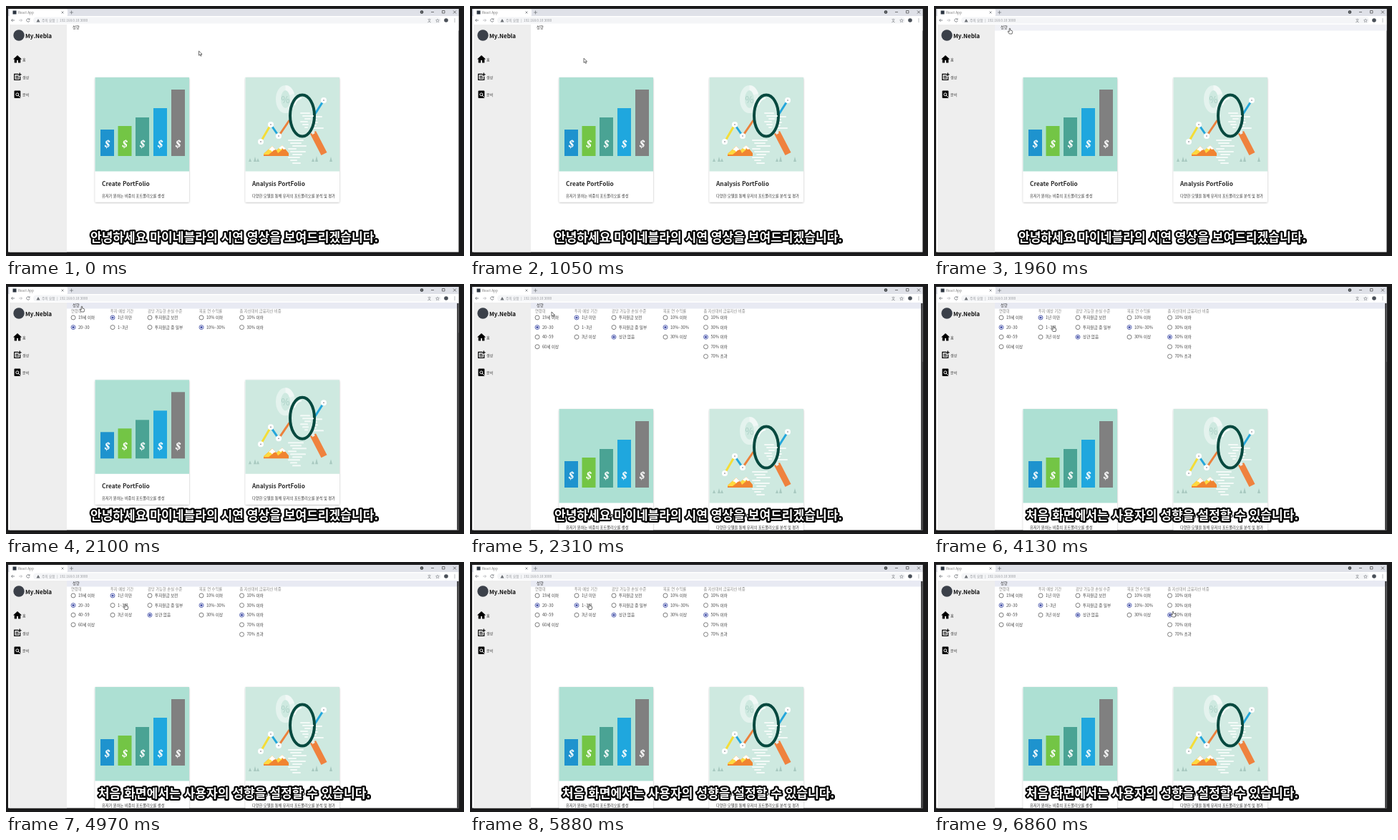
Animation, 640 px wide and 350 px high, one loop 6930 ms. Source, as an HTML page:

```html
<!DOCTYPE html>
<html lang="ko">
<head>
<meta charset="utf-8">
<title>Portfolio demo</title>
<style>
  html, body { margin: 0; width: 100%; height: 100%; overflow: hidden; background: #1b1b1c; }
  svg { display: block; width: 100vw; height: 100vh; }
  text { font-family: "Noto Sans CJK KR", "Noto Sans CJK", "Noto Sans", sans-serif; white-space: pre; }
  .caption { font-size: 17.1px; font-weight: 700; fill: #fff; stroke: #000; stroke-width: 4.5px;
             stroke-linejoin: round; paint-order: stroke; text-anchor: middle; }
</style>
</head>
<body>
<svg viewBox="0 0 640 350">
  <defs>
    <clipPath id="window"><rect x="3" y="4" width="629.5" height="340.5"/></clipPath>
    <clipPath id="page"><rect x="85" y="26" width="548" height="319"/></clipPath>
    <clipPath id="panel"><rect id="panelClip" x="85" y="34" width="548" height="0"/></clipPath>
    <filter id="shadow" x="-10%" y="-10%" width="120%" height="120%">
      <feDropShadow dx="0" dy="0.8" stdDeviation="1" flood-opacity=".3"/>
    </filter>
  </defs>
  <rect width="640" height="350" fill="#1b1b1c"/>
  <g clip-path="url(#window)">
    <rect x="3" y="3" width="630" height="342" fill="#fff"/>
    <g id="browser"></g>
    <g clip-path="url(#page)">
      <g id="content"></g>
      <g id="form" clip-path="url(#panel)"></g>
      <g id="header"></g>
    </g>
    <g id="sidebar"></g>
    <rect id="pageEdge" x="630.3" y="27" width="3" height="318" fill="#2a2a2c"/>
  </g>
  <g id="cursor">
    <path id="arrow" d="M0 0v6.2l1.5-1.3 1.1 2.3 1-.5-1-2.2h2z" fill="#fff" stroke="#333" stroke-width=".7"/>
    <path id="hand" d="M-.8 .6Q0-.5 .7 .6V3l2.4.6Q4 4 3.6 5.5L3 8H-.7L-2.8 5q0-1 1-.6l1 .8z"
          fill="#fff" stroke="#333" stroke-width=".7"/>
  </g>
  <text id="caption" class="caption" x="319" y="330.4"></text>
</svg>
<script>
const LOOP = 6930, STEP = 70;
const HOVER_AT = 1680, OPEN_AT = 2000, OPEN_MS = 300, OPEN_HEIGHT = 75;
const CAPTION_AT = 4060, PICK_AT = 5670;
const $ = id => document.getElementById(id);

const rect = (x, y, w, h, fill, extra = '') =>
  `<rect x="${x}" y="${y}" width="${w}" height="${h}" fill="${fill}" ${extra}/>`;
const circle = (x, y, r, fill, extra = '') => `<circle cx="${x}" cy="${y}" r="${r}" fill="${fill}" ${extra}/>`;
const ellipse = (x, y, rx, ry, fill, extra = '') =>
  `<ellipse cx="${x}" cy="${y}" rx="${rx}" ry="${ry}" fill="${fill}" ${extra}/>`;
const line = (d, color, width = 1, extra = '') =>
  `<path d="${d}" fill="none" stroke="${color}" stroke-width="${width}" ${extra}/>`;
const shape = (d, fill) => `<path d="${d}" fill="${fill}"/>`;
const text = (x, y, size, str, fill = '#333', extra = '') =>
  `<text x="${x}" y="${y}" font-size="${size}" fill="${fill}" ${extra}>${str}</text>`;

function browser() {
  const grey = '#6b6f74';
  return rect(3, 3, 630, 11, '#dfe1e8') + rect(5, 4, 81, 10.5, '#fff', 'rx="2"') +
    rect(9.5, 6.5, 5, 5, '#2b3440') + text(17, 10.7, 4.6, 'React App', '#777') +
    line('M77.5 7.5l3 3m0-3l-3 3M89 9h5m-2.5-2.5v5', grey, .7) +
    circle(581, 8.5, 2.3, '#3c4043') + line('M580 8l1 1 1-1', '#fff', .5) +
    line('M594 8.5h4M609.5 6.5h3.5v3.5h-3.5zM625 6.5l4 4m0-4l-4 4', '#444', .7) +
    rect(3, 14, 630, 12, '#fff') + rect(38, 15.5, 570, 9, '#f4f5f7', 'rx="4.5"') +
    line('M12 20H7.5m2-2l-2 2 2 2', grey, .8) + line('M18 20h4.5m-2-2l2 2-2 2', '#b5b7ba', .8) +
    line('M32.6 18.6a2.2 2.2 0 1 0 .4 2M33 17.3v1.7h-1.7', grey, .8) +
    shape('M42.5 22.5l2.5-4.5 2.5 4.5z', grey) +
    text(50, 22, 4.7, '주의 요함  |  192.168.0.10:3000', '#96999e') + text(589, 22, 5, '文', grey) +
    line('M603 18l.7 1.5 1.7.2-1.3 1.2.4 1.7-1.5-.9-1.5.9.4-1.7-1.3-1.2 1.7-.2z', grey, .5) +
    circle(615, 20, 2.8, '#4a5058') + [18, 20, 22].map(y => circle(627, y, .6, grey)).join('');
}

function sidebar() {
  const label = (y, str) => text(23, y, 5, str);
  return rect(5, 26, 80, 319, '#eee') +
    circle(18, 41, 7.7, '#3b4049') + text(27, 45, 8, 'My.Nebla', '#111', 'font-weight="700"') +
    shape('M16 69l6 5.5h-1.7v5h-3.3v-3.6h-2v3.6h-3.3v-5H10z', '#000') + label(77, '홈') +
    line('M17 95.3h-5.3v8h8v-4.5M13.5 98.3h4M13.5 100.7h4.5', '#000', 1.2) +
    line('M19.2 93.5v4.6M16.9 95.8h4.6', '#000', 1.2) + label(101.5, '생성') +
    rect(11.5, 118.5, 8.8, 10.5, '#000', 'rx="1"') + circle(15.8, 123.8, 2, '#000', 'stroke="#fff"') +
    line('M17.2 125.2l2.6 2.6', '#fff', 1) + label(126, '분석');
}

function barArt() {
  const bars = [[132, 173, '#1e93ce'], [156.5, 168, '#73c545'], [181, 156, '#4aa394'],
                [206, 143, '#1fa7de'], [231, 117, '#808080']];
  return rect(124.5, 100, 131.5, 131.5, '#ade0d3') + bars.map(([x, y, color]) =>
    rect(x, y, 19, 210 - y, color) +
    `<text x="${x + 9.5}" y="198" font-size="14" fill="#fff" text-anchor="middle"
      style="font-family:'Noto Serif',serif;font-weight:700;font-style:italic">$</text>`).join('');
}

function lensArt() {
  const dashes = (x, y, widths) => widths.map((w, i) =>
    rect(x + i % 3 * 3, y + i * 4, w, 2, '#f3faf7', 'rx=".9"')).join('');
  const nodes = [[356, 190], [370, 166], [381, 182], [444, 132]];
  const trees = [[341, 5], [348, 7], [352, 5], [429, 5], [434, 8], [454, 7]];
  return rect(334.5, 100, 131.5, 131.5, '#cee9e0') +
    ellipse(390.5, 130.5, 10, 16, 'none', 'stroke="#e4f3ee" stroke-width="7"') +
    line('M390.5 114.5a10 16 0 0 1 9 9', '#f1f8f6', 7) +
    text(390.5, 136, 13, '%', '#a9cec4', 'text-anchor="middle"') +
    dashes(420, 150, [13, 19, 9, 16, 11, 18, 7]) + dashes(394, 187, [22, 16, 20, 12, 22, 14, 17, 10, 12]) +
    line('M356 190L370 166', '#f4dd37', 3) + line('M370 166L381 182', '#23a6db', 3) +
    line('M381 182L396 160', '#ec813c', 3) + line('M430 154L444 132', '#23a6db', 3) +
    nodes.map(([x, y]) => circle(x, y, 4, '#fff') + circle(x, y, .8, '#667')).join('') +
    shape('M360 210v-3l12-11 6 6 8-7 9 11v4z', '#f08431') +
    shape('M360 207l12-11v8l-5 4h-7zM378 202l8-7v6l-6 5z', '#ffd93f') +
    shape('M367 201l5-5 5 5-3 1-2 2-2-2zM381 199l5-4 5 5-3 1-2-2-2 2z', '#fff') +
    trees.map(([x, h]) => shape(`M${x - 2} 218l2-${h} 2 ${h}z`, '#a8c9c0')).join('') +
    line('M429 177L444.5 207', '#ef823e', 9) + line('M426 172l4 7', '#e8efec', 4) +
    ellipse(414, 153.5, 17, 29, '#d3ece4', 'fill-opacity=".9" stroke="#07493f" stroke-width="4"') +
    dashes(411, 149, [14, 16, 9, 11, 9, 5]) + line('M403 139q3-9 10-10', '#fff', 1.5);
}

const card = (x, art, title, note) =>
  `<g filter="url(#shadow)">${rect(x, 100, 131.5, 174.5, '#fff', 'rx="1.5"')}</g>` +
  art + text(x + 9.5, 252, 8.3, title, '#2b2b2b', 'font-weight="700"') + text(x + 9.5, 267.6, 5.23, note);

function content() {
  return card(124.5, barArt(), 'Create PortFolio', '유저가 원하는 비중의 포트폴리오를 생성') +
    card(334.5, lensArt(), 'Analysis PortFolio', '다양한 모델을 통해 유저의 포트폴리오를 분석 및 평가');
}

const columns = [
  [91, '연령대', ['19세 이하', '20~30', '40~59', '60세 이상'], 1],
  [146, '투자 예상 기간', ['1년 미만', '1~3년', '3년 이상'], 0],
  [198, '감당 가능한 손실 수준', ['투자원금 보전', '투자원금 중 일부', '상관 없음'], 2],
  [270, '목표 연 수익률', ['10% 이하', '10%~30%', '30% 이상'], 1],
  [326.5, '총 자산대비 금융자산 비중', ['10% 이하', '30% 이하', '50% 이하', '70% 이하', '70% 초과'], 2]
];

function form(period) {
  return rect(85, 34, 548, 75, '#fff') + columns.map(([x, title, options, chosen], c) =>
    text(x, 39.7, 5.3, title, '#858585') + options.map((option, i) => {
      const y = 47 + i * 13.6, on = i === (c === 1 ? period : chosen);
      return circle(x + 3, y, 3, '#fff', `stroke="${on ? '#4a57ac' : '#707070'}" stroke-width=".9"`) +
        (on ? circle(x + 3, y, 1.6, '#3f4ca6') : '') + text(x + 10, y + 2, 5.6, option, '#444');
    }).join('')).join('');
}

// Cursor stops: time, x, y, and whether the hand is shown from there on.
const stops = [
  [0, 269.5, 63], [280, 269.5, 63], [350, 232, 73], [490, 214, 72], [630, 181, 68], [910, 181, 68],
  [1260, 126, 81], [1400, 118, 60], [1680, 106, 31, 1], [2170, 106, 31, 1], [2310, 114, 39],
  [2730, 114, 41], [2940, 128, 52], [3080, 140, 57], [3360, 167.5, 60, 1], [3570, 167.5, 60, 1],
  [3710, 167, 58.5, 1], [5880, 167, 58.5, 1], [6440, 221, 60, 1], [6580, 232, 61, 1],
  [6860, 334, 69, 1], [LOOP, 334, 69, 1]
];

function cursorAt(t) {
  const i = stops.findIndex((s, k) => t >= s[0] && t < stops[k + 1][0]);
  const [a, b] = [stops[i], stops[i + 1]], k = (t - a[0]) / (b[0] - a[0]);
  return { x: a[1] + (b[1] - a[1]) * k, y: a[2] + (b[2] - a[2]) * k, hand: !!a[3] };
}

// Equivalent to cubic-bezier(.4, 0, .2, 1)
function ease(x) {
  if (x <= 0 || x >= 1) return Math.min(1, Math.max(0, x));
  let lo = 0, hi = 1;
  for (let i = 0; i < 20; i++) {
    const u = (lo + hi) / 2, v = 1 - u;
    if (1.2 * v * v * u + .6 * v * u * u + u ** 3 < x) lo = u; else hi = u;
  }
  return 3 * (1 - lo) * lo * lo + lo ** 3;
}

const show = (id, visible) => $(id).setAttribute('visibility', visible ? 'visible' : 'hidden');

$('browser').innerHTML = browser();
$('sidebar').innerHTML = sidebar();
$('content').innerHTML = content();
$('header').innerHTML = rect(85, 26, 548, 8.5, '#fff', 'id="bar"') + text(93, 32.2, 5.3, '성향');

let shownPeriod = -1;
function draw(now) {
  const t = Math.floor(now % LOOP / STEP) * STEP;
  const height = OPEN_HEIGHT * ease((t - OPEN_AT) / OPEN_MS);
  const period = t < PICK_AT ? 0 : 1, cursor = cursorAt(t);
  if (period !== shownPeriod) $('form').innerHTML = form(shownPeriod = period);
  $('content').setAttribute('transform', `translate(0 ${height})`);
  $('panelClip').setAttribute('height', height);
  $('bar').setAttribute('fill', height > 0 ? '#e8eaf3' : t >= HOVER_AT ? '#f0f1f6' : '#fff');
  show('pageEdge', height > 0);
  $('cursor').setAttribute('transform', `translate(${cursor.x} ${cursor.y})`);
  show('hand', cursor.hand);
  show('arrow', !cursor.hand);
  $('caption').textContent = t < CAPTION_AT
    ? '안녕하세요 마이네블라의 시연 영상을 보여드리겠습니다.'
    : '처음 화면에서는 사용자의 성향을 설정할 수 있습니다.';
}

const start = performance.now();
function tick() {
  draw(performance.now() - start);
  requestAnimationFrame(tick);
}
tick();
</script>
</body>
</html>
```
